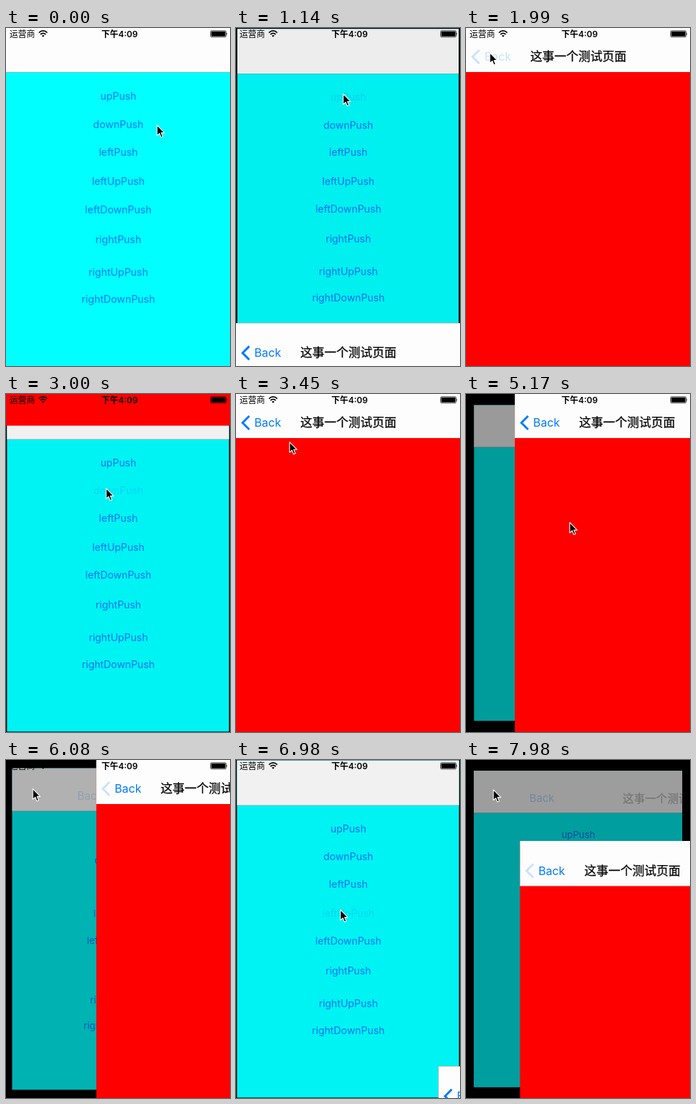
Write an HTML page that moves like this. It is 317 by 476 pixels and loops after 8000 ms.

```html
<!DOCTYPE html>
<html lang="zh-CN">
<head>
<meta charset="utf-8">
<title>Push directions</title>
<style>
  html, body { margin: 0; width: 100%; height: 100%; overflow: hidden; background: #000; }
  svg { display: block; width: 317px; height: 476px; }
  text { font-family: Inter, "Noto Sans CJK SC", "Noto Sans CJK", sans-serif; white-space: pre; }
  .button { font-size: 14.4px; fill: #007aff; text-anchor: middle; }
  .back { font-size: 16.2px; fill: #007aff; }
  .title { font-size: 17px; font-weight: 500; stroke: #000; stroke-width: .25px; }
  .status { font-size: 12px; }
  .clock { font-weight: 600; }
</style>
</head>
<body>
<svg viewBox="0 0 317 476">
  <rect width="317" height="476"/>
  <g id="home">
    <rect y="-1.5" width="317" height="479" fill="#0ff"/>
    <rect y="-1.5" width="317" height="64" fill="#fdfdfd"/>
    <rect y="62" width="317" height=".6" fill="#000" opacity=".35"/>
    <svg width="317" height="476">
      <g id="ghost">
        <text id="ghostBack" class="back" x="26" y="46">Back</text>
        <text id="ghostTitle" class="title" x="91" y="46.3">这事一个测试页面</text>
      </g>
    </svg>
    <g id="buttons"></g>
  </g>
  <g id="page">
    <rect y="-1.5" width="317" height="479" fill="#f00"/>
    <rect y="-1.5" width="317" height="63.5" fill="#fdfdfd"/>
    <path id="chevron" d="M18.8 31L9.3 40.5L18.8 50" fill="none" stroke="#007aff" stroke-width="3"/>
    <text id="back" class="back" x="26" y="46">Back</text>
    <text class="title" x="91" y="46.3">这事一个测试页面</text>
  </g>
  <g id="statusBar">
    <text class="status" x="5" y="12.6">运营商</text>
    <g fill="none" stroke="#000" stroke-width="1.7">
      <path d="M46.6 6.6Q52.5 1.2 58.4 6.6M48.8 9Q52.5 5.6 56.2 9"/>
      <path d="M52.5 12.8L50.6 10.7Q52.5 9.2 54.4 10.7Z" fill="#000" stroke="none"/>
    </g>
    <text class="status clock" x="135" y="12.6">下午4:09</text>
    <rect x="289.5" y="3.8" width="22" height="9" rx="1.6" fill="none" stroke="#000" stroke-width=".7"/>
    <rect x="290.5" y="4.8" width="20" height="7" rx=".7"/>
    <path d="M312.4 6.6Q314 8.3 312.4 10Z"/>
  </g>
  <path id="cursor" d="M.8 .9V15.6L4.2 12.5L6.5 18L9 17L6.7 11.6H11.3Z" stroke="#fff" stroke-width="1.1" stroke-linejoin="round"/>
</svg>
<script>
const LOOP = 8000, MOVE = 300, W = 317, H = 479, TAP_LEAD = 40;

const labels = [
  ['upPush', 95.5], ['downPush', 135.5], ['leftPush', 174.5], ['leftUpPush', 215.5],
  ['leftDownPush', 255.5], ['rightPush', 298], ['rightUpPush', 344], ['rightDownPush', 382]
];

// dx, dy: side the page comes from, in stage sizes
const visits = [
  { push: 1066, pop: 2025, dx: 0, dy: 1 },
  { push: 2936, pop: 4000, dx: 0, dy: -1 },
  { push: 4968, pop: 5948, dx: 1, dy: 0 },
  { push: 6916, pop: 7879, dx: 1, dy: 1 }
];

// time, x, y of the pointer tip
const pointer = [
  [0, 213, 136], [30, 213, 136], [770, 151, 92], [1180, 151, 92], [1750, 33, 34],
  [2120, 33, 34], [2660, 141, 132], [3050, 141, 132], [3690, 48, 40], [4090, 48, 40],
  [4610, 146, 180], [5170, 146, 180], [5670, 36, 38], [6040, 36, 38],
  [6600, 147, 210], [7020, 147, 210], [7600, 38, 41], [LOOP, 38, 41]
];

const $ = id => document.getElementById(id);
const clamp = v => Math.min(1, Math.max(0, v));
const shift = (el, x, y) => el.setAttribute('transform', `translate(${x} ${y})`);

// cubic-bezier(.42, 0, .58, 1)
function ease(v) {
  let lo = 0, hi = 1;
  for (let i = 0; i < 20; i++) {
    const s = (lo + hi) / 2, r = 1 - s;
    if (1.26 * s * r * r + 1.74 * s * s * r + s * s * s < v) lo = s; else hi = s;
  }
  return lo * lo * (3 - 2 * lo);
}
const ramp = (t, start) => t <= start ? 0 : t >= start + MOVE ? 1 : ease((t - start) / MOVE);

const buttons = labels.map(([name, y]) => {
  const el = document.createElementNS('http://www.w3.org/2000/svg', 'text');
  el.setAttribute('class', 'button');
  el.setAttribute('x', 159);
  el.setAttribute('y', y + 5);
  el.textContent = name;
  $('buttons').append(el);
  return el;
});

function placePointer(t) {
  const i = pointer.findIndex(k => k[0] > t);
  const [t0, x0, y0] = pointer[i - 1], [t1, x1, y1] = pointer[i];
  const e = ease((t - t0) / (t1 - t0));
  shift($('cursor'), x0 + (x1 - x0) * e, y0 + (y1 - y0) * e);
}

function draw(t) {
  const n = visits.findLastIndex(v => t >= v.push - TAP_LEAD);
  const v = visits[n];
  const p = v ? ramp(t, v.push) - ramp(t, v.pop) : 0;

  $('home').setAttribute('transform', `translate(158.5 238) scale(${1 - .0915 * p}) translate(-158.5 -238)`);
  $('home').setAttribute('opacity', 1 - .5 * p);
  $('page').setAttribute('visibility', p > 0 ? 'visible' : 'hidden');
  buttons.forEach((b, i) => {
    const fade = i === n ? clamp((t - v.push - 160) / 250) : 1;
    b.setAttribute('opacity', .2 + .8 * fade);
  });

  if (v) {
    shift($('page'), v.dx * W * (1 - p), v.dy * H * (1 - p));
    const sinceTap = t - v.pop + TAP_LEAD;
    $('back').setAttribute('opacity', sinceTap >= 0 && sinceTap < 110 ? .2 : 1);
    $('chevron').setAttribute('opacity', sinceTap >= 0 ? .2 : 1);
  }

  // bar items of the leaving page slide away inside the shrunken home bar
  const u = v ? clamp((t - v.pop) / MOVE) : 0;
  const q = 1 - (1 - u) ** 2;
  $('ghost').setAttribute('opacity', u > 0 ? .6 * (1 - q) : 0);
  shift($('ghostBack'), 104 * q, 0);
  shift($('ghostTitle'), 240 * q, 0);

  placePointer(t);
}

const begin = performance.now();
function tick() {
  draw((performance.now() - begin) % LOOP);
  requestAnimationFrame(tick);
}
tick();
</script>
</body>
</html>
```
